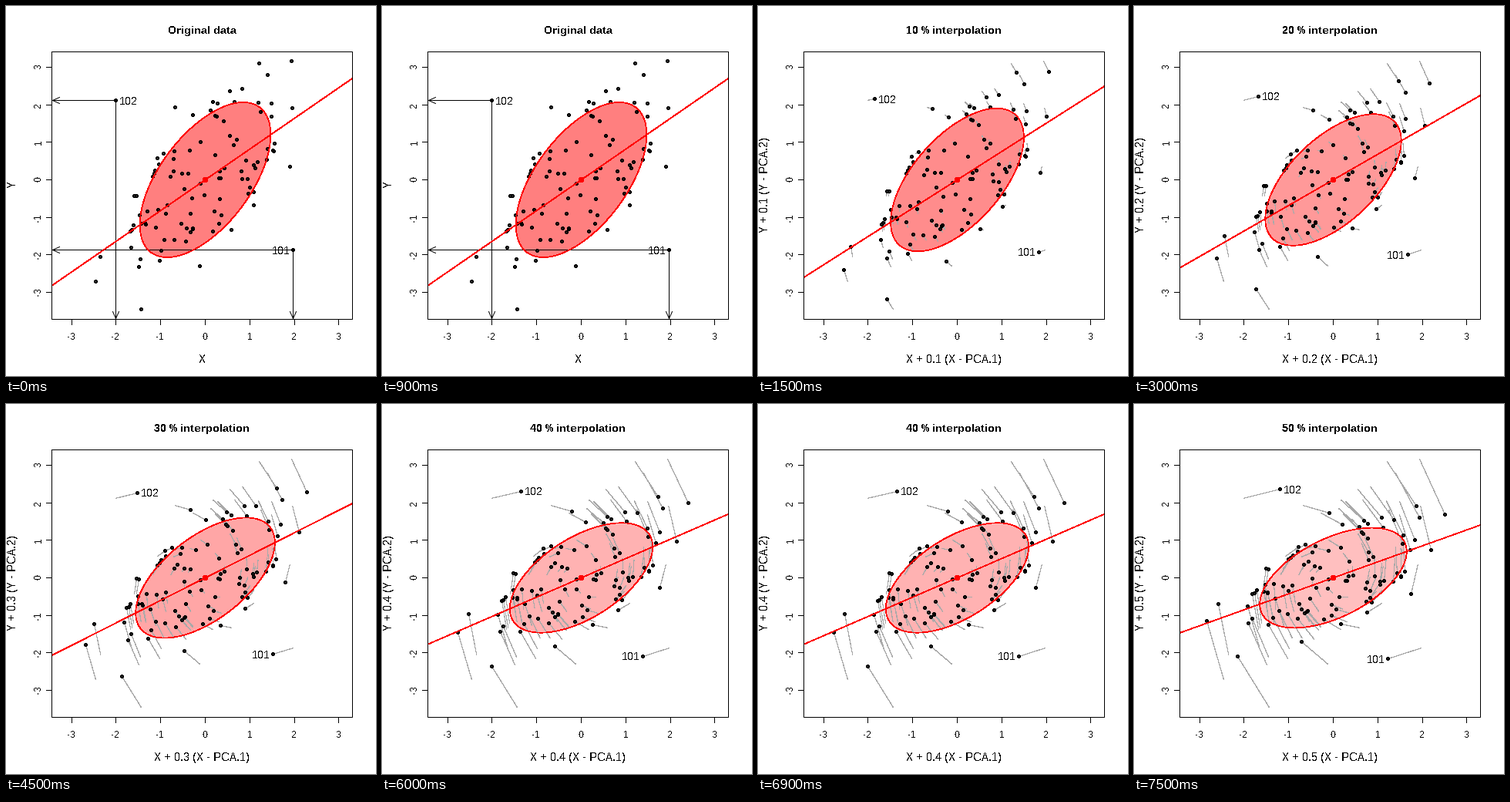
A matplotlib script for the animation above (8 s loop, 480x480 px).

```python
import numpy as np
import matplotlib.pyplot as plt
from matplotlib.animation import FuncAnimation
from matplotlib.collections import LineCollection, PolyCollection

plt.rcParams.update({
    "font.family": "Liberation Sans",
    "text.antialiased": False,
    "text.hinting": "native",
    "text.hinting_factor": 1,
})

SIZE, DPI = 480, 72
LEFT, RIGHT, TOP, BOTTOM = 59, 449, 59, 406
MID_X, MID_Y = 253.5, 231.5
ORIGIN = np.array([258.0, 225.0])
UNIT = np.array([57.77, -48.67])
STEP_MS, HOLD, FRAMES = 500, 3, 16

# Spread of the data; the scores come from its correlation matrix
SX, SY, COR, REACH = 0.96, 1.35, 0.582, 1.53
COV = np.array([[SX**2, COR * SX * SY], [COR * SX * SY, SY**2]])
PCA = np.sqrt(0.5) * np.array([[1 / SX, 1 / SY], [-1 / SX, 1 / SY]])

# Points 101 and 102, then the most distant of the sample, in data units
MARKED = [(1.98, -1.87), (-2.01, 2.12)]
FAR = [
    (1.94, 3.16), (1.21, 3.10), (1.40, 2.79), (0.55, 2.36), (-0.68, 1.93),
    (1.96, 1.91), (1.90, 0.35), (1.09, -0.68), (-1.14, 0.16),
    (-2.35, -2.05), (-2.46, -2.71), (-1.49, -2.32), (-1.44, -3.45),
    (-0.12, -2.30),
]
TURN = np.linspace(0, 2 * np.pi, 200)
CIRCLE = np.column_stack([np.cos(TURN), np.sin(TURN)])


def sample(count=86, reach=1.85):
    """The named points plus a correlated cloud, densest in the middle."""
    rng = np.random.default_rng(4)
    angle = rng.uniform(0, 2 * np.pi, count)
    radius = reach * rng.uniform(0, 1, count) ** 0.6
    cloud = radius * np.array([np.cos(angle), np.sin(angle)])
    return np.vstack([MARKED, FAR, (np.linalg.cholesky(COV) @ cloud).T])


DATA = sample()


def to_px(xy):
    return ORIGIN + UNIT * xy


def line(x, y, z=2):
    ax.plot(x, y, color="black", lw=1, zorder=z, snap=False,
            solid_capstyle="projecting", solid_joinstyle="miter")


def red_line(x, y):
    # Hard-edged strokes come out about a pixel wider than asked for
    ax.plot(x, y, color="red", lw=0.7, zorder=5, antialiased=False,
            snap=False, solid_capstyle="butt")


def label(x, y, text, size=14.4, **kw):
    kw = {"ha": "center", "va": "baseline", "rotation_mode": "anchor", **kw}
    ax.text(x, y, text, fontsize=size, zorder=8, **kw)


def discs(centers, r, face, edge="none", width=0, z=4):
    shapes = np.asarray(centers)[:, None] + r * CIRCLE[::8]
    ax.add_collection(PolyCollection(
        shapes, facecolors=[face], edgecolors=edge, linewidths=width,
        antialiaseds=False, zorder=z), autolim=False)


def axes_box():
    line([LEFT, RIGHT, RIGHT, LEFT, LEFT], [TOP, TOP, BOTTOM, BOTTOM, TOP], 7)
    for v in range(-3, 4):
        x, y = np.round(to_px(np.array([v, v])))
        line([x, x], [BOTTOM, BOTTOM + 7], 7)
        line([LEFT - 7, LEFT], [y, y], 7)
        label(x - 0.5, 432.5, str(v), 12)
        label(45, y - 0.5, str(v), 12, rotation=90)


def arrows(px):
    """Read-off arrows from a point to both axes."""
    x, y = px
    line([x, LEFT + 1], [y, y])
    line([LEFT + 10, LEFT + 1, LEFT + 10], [y - 4, y, y + 4])
    line([x, x], [y, BOTTOM])
    line([x - 4, x, x + 4], [BOTTOM - 10, BOTTOM - 1, BOTTOM - 10])


def fit(mix, alpha):
    """Spread ellipse and regression line of the mixed data."""
    cov = mix @ COV @ mix.T
    edge = to_px(REACH * CIRCLE @ np.linalg.cholesky(cov).T)
    ax.fill(*edge.T, color="red", alpha=alpha, lw=0, zorder=1)
    red_line(*edge.T)
    slope = cov[0, 1] / cov[0, 0] * UNIT[1] / UNIT[0]
    ends = np.array([LEFT, RIGHT])
    red_line(ends, ORIGIN[1] + slope * (ends - ORIGIN[0]))
    discs([ORIGIN], 3.2, "red", z=6)


def draw(i):
    step = i // HOLD
    t = step / 10
    mix = (1 - t) * np.eye(2) + t * PCA
    start = to_px(DATA)
    now = np.round(to_px(DATA @ mix.T))

    ax.clear()
    ax.set(xlim=(-0.5, SIZE - 0.5), ylim=(SIZE - 0.5, -0.5))
    ax.axis("off")

    fit(mix, 0.5 - t / 2)
    discs(now, 1.35, (0, 0, 0, 0.6), "black", 1)
    if step == 0:
        for p in now[:2]:
            arrows(p)
        title, xlab, ylab = "Original data", "X", "Y"
    else:
        ax.add_collection(LineCollection(
            np.stack([start, now], axis=1), colors="#a9a9a9", linewidths=0.1,
            antialiaseds=False, zorder=3), autolim=False)
        title = f"{step * 10} % interpolation"
        xlab = f"X + {t:.1f} (X - PCA.1)"
        ylab = f"Y + {t:.1f} (Y - PCA.2)"

    label(now[0, 0] - 4, now[0, 1] + 5, "101", ha="right")
    label(now[1, 0] + 4, now[1, 1] + 5, "102", ha="left")
    axes_box()
    label(MID_X, 35.5, title, weight="bold")
    label(MID_X, 462.5, xlab, 15)
    label(12.5, MID_Y, ylab, 15, rotation=90)
    return []


fig = plt.figure(figsize=(SIZE / DPI, SIZE / DPI), dpi=DPI, facecolor="white")
ax = fig.add_axes([0, 0, 1, 1])
anim = FuncAnimation(fig, draw, frames=FRAMES, init_func=lambda: [],
                     interval=STEP_MS, repeat=True)
plt.show()
```
